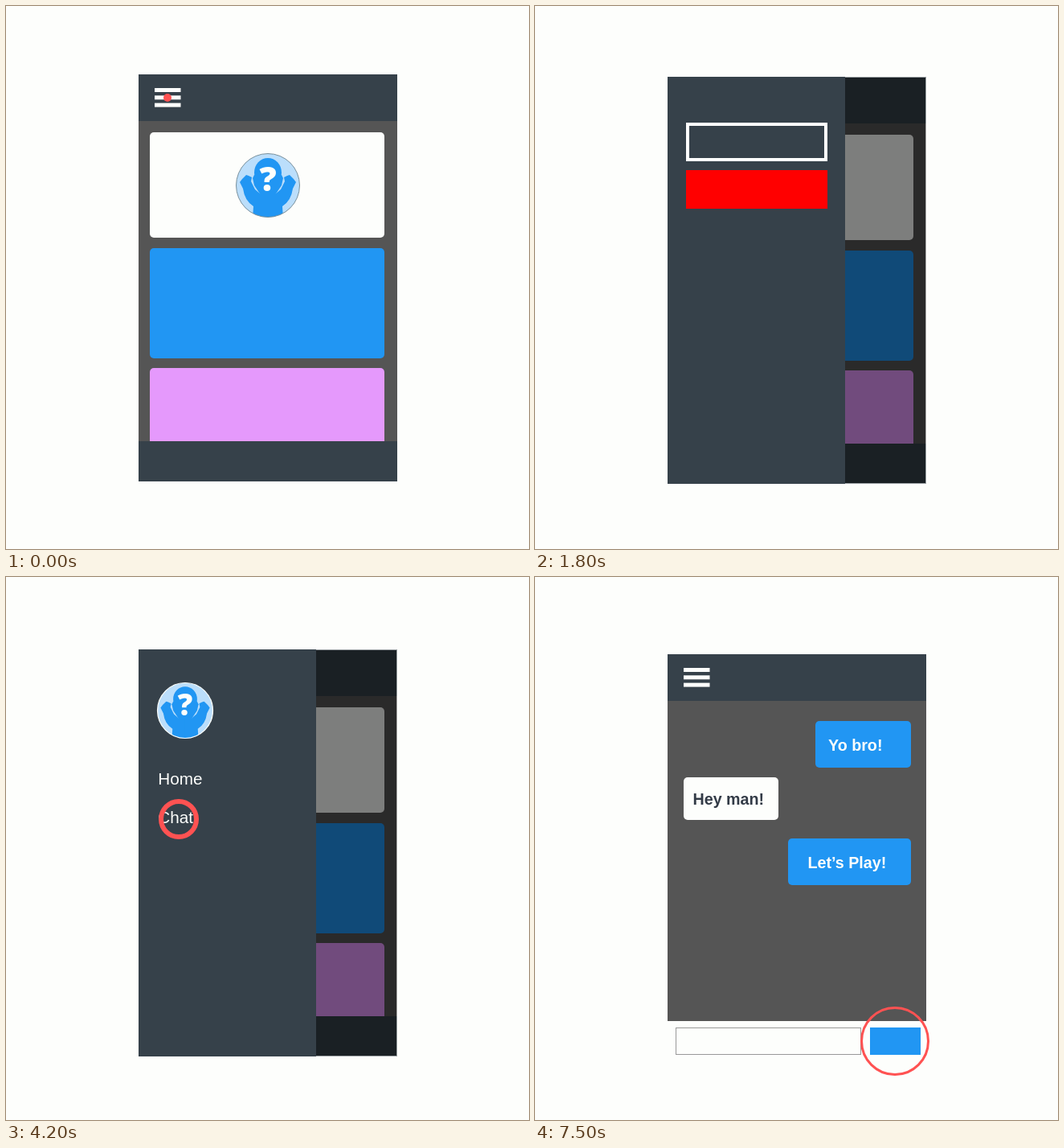
Write an HTML page that moves like this. It is 651 by 675 pixels and loops after 7.8 s.

```html
<!DOCTYPE html>
<html lang="en">
<head>
<meta charset="utf-8">
<title>Drawer and chat</title>
<style>
  html, body { margin: 0; width: 100%; height: 100%; overflow: hidden; background: #fdfefc; }
  svg { display: block; width: 651px; height: 675px; }
  text { font: 20.7px "Liberation Sans", Arial, sans-serif; fill: #fdfefc; }
  .bold { font-weight: 700; font-size: 19.7px; }
  .ask { font: 800 42px "Open Sans", "Noto Sans", sans-serif; text-anchor: middle; }
  .bar { fill: #36414a; }
  .page { fill: #555; }
  .paper { fill: #fdfefc; }
  .blue { fill: #2196f3; }
</style>
</head>
<body>
<svg viewBox="0 0 651 675">
  <defs>
    <clipPath id="screen"><rect width="322" height="506"/></clipPath>
    <clipPath id="disc"><circle r="39.5"/></clipPath>
    <g id="avatar">
      <circle r="39.5" fill="#bbdefb"/>
      <g class="blue" clip-path="url(#disc)">
        <ellipse cy="-16" rx="17" ry="18"/>
        <path d="M-17 -13H17L19 -9L17 0L9 12H-9L-17 0L-19 -9Z"/>
        <path id="arm" d="M-35 -4L-32 -8L-27 -13L-24 -12L-20 -10L-21 -5L-16 5L-9 11H1V41H-19L-18 26Q-29 19 -31 4Z"/>
        <use href="#arm" transform="scale(-1 1)"/>
      </g>
      <text class="ask" x="0" y="6.5">?</text>
    </g>
    <rect id="line" class="paper" x="20" width="32.5" height="5"/>
  </defs>
  <rect class="paper" width="651" height="675"/>

  <g id="phone">
    <g clip-path="url(#screen)">
      <rect class="page" width="322" height="506"/>
      <g id="home">
        <rect class="paper" x="14" y="72" width="292" height="131" rx="5"/>
        <use href="#avatar" x="161" y="138"/>
        <circle cx="161" cy="138" r="39.5" fill="none" stroke="#78909c"/>
        <rect class="blue" x="14" y="216" width="292" height="137" rx="5"/>
        <rect x="14" y="365" width="292" height="120" rx="5" fill="#e599fc"/>
        <rect class="bar" y="456" width="322" height="50"/>
      </g>
      <g id="chat">
        <rect class="blue" x="184" y="83" width="119" height="58" rx="5"/>
        <text class="bold" x="200" y="120">Yo bro!</text>
        <rect class="paper" x="20" y="153" width="118" height="53" rx="5"/>
        <text class="bold" x="31.5" y="187" style="fill:#333b47">Hey man!</text>
        <g id="sent">
          <rect class="blue" x="150" y="229" width="153" height="58" rx="5"/>
          <text class="bold" x="174.5" y="266">Let’s Play!</text>
        </g>
        <rect class="paper" y="456" width="322" height="50"/>
        <rect x="10.5" y="464.5" width="230" height="33" fill="none" stroke="#999"/>
        <rect class="blue" x="252" y="464" width="63" height="34"/>
        <text class="bold" id="draft" x="17.5" y="488" style="fill:#444"></text>
      </g>
      <rect class="bar" width="322" height="58"/>
      <use href="#line" y="17"/>
      <use href="#line" y="26.3"/>
      <use href="#line" y="35.6"/>
      <g id="scrim">
        <rect width="322" height="506"/>
        <rect x=".5" y=".5" width="321" height="505" fill="none" stroke="#fdfefc"/>
      </g>
      <rect id="drawer" class="bar" width="221" height="506"/>
      <g id="login">
        <rect x="25" y="59" width="172" height="44" fill="none" stroke="#fff" stroke-width="4"/>
        <rect x="23" y="116" width="176" height="48" fill="#f00"/>
      </g>
      <g id="links">
        <use href="#avatar" transform="translate(58 76) scale(.875)"/>
        <circle cx="58" cy="76" r="34.5" fill="none" stroke="#fdfefc" stroke-width="1.2"/>
        <text x="24.3" y="168">Home</text>
        <text x="24.3" y="216">Chat</text>
      </g>
    </g>
  </g>
  <circle id="ripple"/>
</svg>
<script>
const STEP = 300, COUNT = 26;
const SIGNED_IN = 12, CHAT = 16, TYPE = 20, SENT = 25;
const MESSAGE = "Let’s Play!";

const taps = [
  { at: -.2, x: 201, y: 114 },   // menu
  { at: 8.5, x: 288, y: 370 },   // drawer
  { at: 9.5, x: 276, y: 225 },   // red button
  { at: 13, x: 215, y: 301 },    // chat link
  { at: 17.5, x: 290, y: 577 },  // message field
  { at: 23, x: 448, y: 577 }     // send button
];

const el = id => document.getElementById(id);
const set = (id, attrs) => {
  for (const name in attrs) el(id).setAttribute(name, attrs[name]);
};
const show = (id, on) => set(id, { display: on ? "inline" : "none" });
const move = (id, x, y) => set(id, { transform: `translate(${x} ${y})` });
const clamp = v => Math.max(0, Math.min(1, v));

// A tap grows as a dot, then opens into a thinning ring.
function drawRipple(step) {
  const tap = taps.filter(t => t.at < step).pop();
  const age = tap ? step - tap.at : Infinity;
  show("ripple", age < 2.3);
  if (age >= 2.3) return;
  const ring = age < 1 ? 0 : 6 / age;
  set("ripple", {
    cx: tap.x, cy: tap.y,
    r: Math.min(25 * age, 43) - ring / 2,
    fill: ring ? "none" : "#ff5252",
    stroke: ring ? "#ff5252" : "none",
    "stroke-width": ring,
    opacity: Math.min(1, 1.6 - age * .4 + .4)
  });
}

function draw(step) {
  const open = clamp(Math.min((step - 3) / 2.4, (CHAT + 1 - step) / 2));
  const shut = 1 - open;
  const signedIn = step >= SIGNED_IN, chatting = step >= CHAT;
  const sway = Math.round(3 * Math.sin(Math.PI * clamp((step - 3.4) / 5.6)));
  const top = chatting ? 96 : signedIn ? 90 : 85 + sway;

  move("phone", 165, top);
  move("drawer", Math.round(-221 * shut), 0);
  move("links", Math.round(-221 * shut), 0);
  move("login", Math.round(-243 * shut), Math.round(8.6 * shut));
  set("scrim", { opacity: .5 * clamp(open * 2.5) });
  show("home", !chatting);
  show("chat", chatting);
  show("login", !signedIn);
  show("links", signedIn);
  show("sent", step >= SENT);
  el("draft").textContent =
    step < SENT ? MESSAGE.slice(0, Math.max(0, (step - TYPE) * 6)) : "";
  drawRipple(step);
}

let last = -1;
const start = performance.now();
function tick() {
  const step = Math.floor((performance.now() - start) / STEP) % COUNT;
  if (step !== last) draw(last = step);
  requestAnimationFrame(tick);
}
tick();
</script>
</body>
</html>
```
